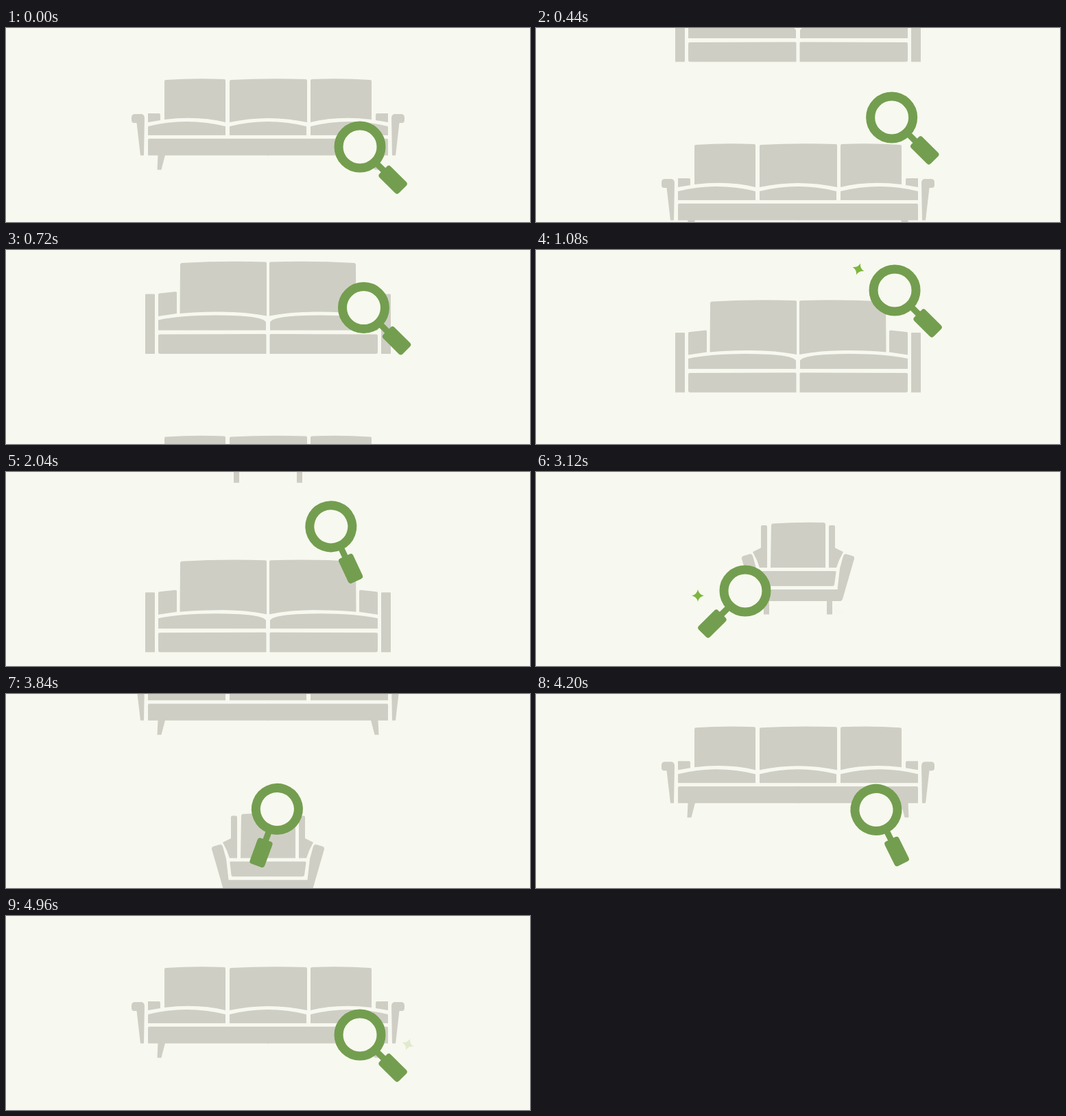
Write an HTML page with a canvas that moves like this. It is 764 px wide and 284 px high and loops after 5 s.

```html
<!DOCTYPE html>
<html lang="en">
<head>
<meta charset="utf-8">
<title>Sofa search</title>
<style>
  html, body { margin: 0; width: 100%; height: 100%; overflow: hidden; background: #f7f8ef; }
  canvas { display: block; }
</style>
</head>
<body>
<canvas id="stage" width="764" height="284"></canvas>
<script>
const ctx = document.getElementById('stage').getContext('2d');
const LOOP = 5000, MOVE = 1000, W = 764, H = 284;
const BG = '#f7f8ef', GREY = '#cfcec5', GREEN = '#739e4f', SPARK = '#7db53f';

// Left halves are mirrored around the middle of the stage.
const furniture = [
  {
    half: new Path2D(`
      M231 78Q231 76 233 76Q276 73 318 75Q320 75 320 77V138Q280 128 231 134Z
      M207 125H223Q225 125 225 127V135L207 138Z
      M207 144Q235 137 263 137Q292 137 320 144V157H207Z
      M207 164Q207 162 209 162H382V186.500H207Z
      M188 126H198Q202 127 202 132L201 186.500H196L190.500 139H187Q183 139 183 135V131Q183 126 188 126Z
      M221.500 186H232L226.500 207.500H220.500Z`),
    middle: new Path2D(`
      M326 78Q326 76 328 76Q382 73 437 75Q439 75 439 77V138Q382 126 326 138Z
      M326 144Q354 137 382 137Q410 137 438 144V157H326Z
      M381 162H383V186.500H381Z`)
  },
  {
    half: new Path2D(`
      M203 122Q203 121 204 121H216Q217 121 217 122V208.500H203Z
      M222 122Q222 120 224 120L247 117.500Q249 117.500 249 119V149.500L222 153.500Z
      M254 78Q254 76 256 75.500Q317 72 378 74Q380 74 380 76V153Q345 146 305 147Q275 147 253.500 149.500Z
      M222 159Q255 152 305 152Q374 152 379 162V174H222Z
      M222 182Q222 180 224 180L378 179.500Q379.500 180 379.500 181V208.500H224Q222 208 222 206Z`)
  },
  {
    half: new Path2D(`
      M328 80Q328 78 330 78H335Q337 78 337 80V140H326L322 129L316 117L328 111Z
      M302 123L312 120Q315 120 316 123L321 141L324.500 172H382V189H320Q318 189 317 186L300 127Q299.500 124 302 123Z
      M332 188H340V208.500H332Z`),
    middle: new Path2D(`
      M343 78Q343 76 345 75.500Q382 73 419 74Q422 74 422 77V140H342Z
      M328 145H435Q438 145 437.500 147L435 165Q434.500 167 432 167H331Q329 167 328.500 165L326.500 147Q326 145 328 145Z
      M381 172H383V189H381Z`)
  }
];

// Pose of the glass at each piece, and the scroll that leads to the next one.
const stops = [
  { x: 533, y: 191, angle: 45,  start: 26,   gap: 254, lag: 0 },
  { x: 540, y: 76,  angle: 45,  start: 1736, gap: 248, lag: 0 },
  { x: 288, y: 191, angle: 135, start: 3405, gap: 248, lag: 90 }
];

// x, y, start time, tilt in degrees
const sparks = [
  [470, 28, 890, 20], [220, 110, 1150, 0], [552, 182, 1310, 15],
  [446, 84, 2700, 15], [236, 181, 2920, 0], [440, 204, 3120, 10],
  [229, 84, 4380, 0], [586, 188, 4585, 20]
];
const SPARK_TIME = 400;
const star = new Path2D('M0-9Q1.500-1.500 9 0Q1.500 1.500 0 9Q-1.500 1.500-9 0Q-1.500-1.500 0-9Z');
const handle = new Path2D();
handle.rect(34, -4.500, 18, 9);
handle.roundRect(48, -11.500, 40, 23, 4);

const mix = (a, b, k) => a + (b - a) * k;
const rad = deg => deg * Math.PI / 180;
function ease(ms) {
  const x = Math.min(1, Math.max(0, ms / MOVE));
  return x * x * (3 - 2 * x);
}

function at(x, y, angle, paint) {
  ctx.save();
  ctx.translate(x, y);
  ctx.rotate(rad(angle));
  paint();
  ctx.restore();
}

function drawPiece({ half, middle }, dy) {
  if (Math.abs(dy) > 240) return;
  ctx.fillStyle = GREY;
  at(0, dy, 0, () => {
    ctx.fill(half);
    if (middle) ctx.fill(middle);
    ctx.translate(W, 0);
    ctx.scale(-1, 1);
    ctx.fill(half);
  });
}

function drawSpark([x, y, start, tilt], t) {
  const p = (t - start) / SPARK_TIME;
  if (p <= 0 || p >= 1) return;
  at(x, y, tilt, () => {
    ctx.globalAlpha = Math.sin(Math.PI * p);
    ctx.fillStyle = SPARK;
    ctx.fill(star);
  });
}

function drawGlass(x, y, angle) {
  at(x, y, angle, () => {
    ctx.translate(-24, 0);
    ctx.fillStyle = GREEN;
    ctx.fill(handle);
    ctx.beginPath();
    ctx.arc(0, 0, 31, 0, 2 * Math.PI);
    ctx.fillStyle = BG;
    ctx.fill();
    ctx.lineWidth = 13;
    ctx.strokeStyle = GREEN;
    ctx.stroke();
  });
}

function draw(t) {
  ctx.fillStyle = BG;
  ctx.fillRect(0, 0, W, H);
  const i = t < stops[1].start ? 0 : t < stops[2].start ? 1 : 2;
  const next = (i + 1) % 3, from = stops[i], to = stops[next];
  const k = ease(t - from.start), turn = ease(t - from.start - from.lag);
  drawPiece(furniture[i], from.gap * k);
  drawPiece(furniture[next], from.gap * (k - 1));
  sparks.forEach(s => drawSpark(s, t));
  drawGlass(mix(from.x, to.x, k), mix(from.y, to.y, k), mix(from.angle, to.angle, turn));
}

function tick() {
  draw(performance.now() % LOOP);
  requestAnimationFrame(tick);
}
tick();
</script>
</body>
</html>
```
